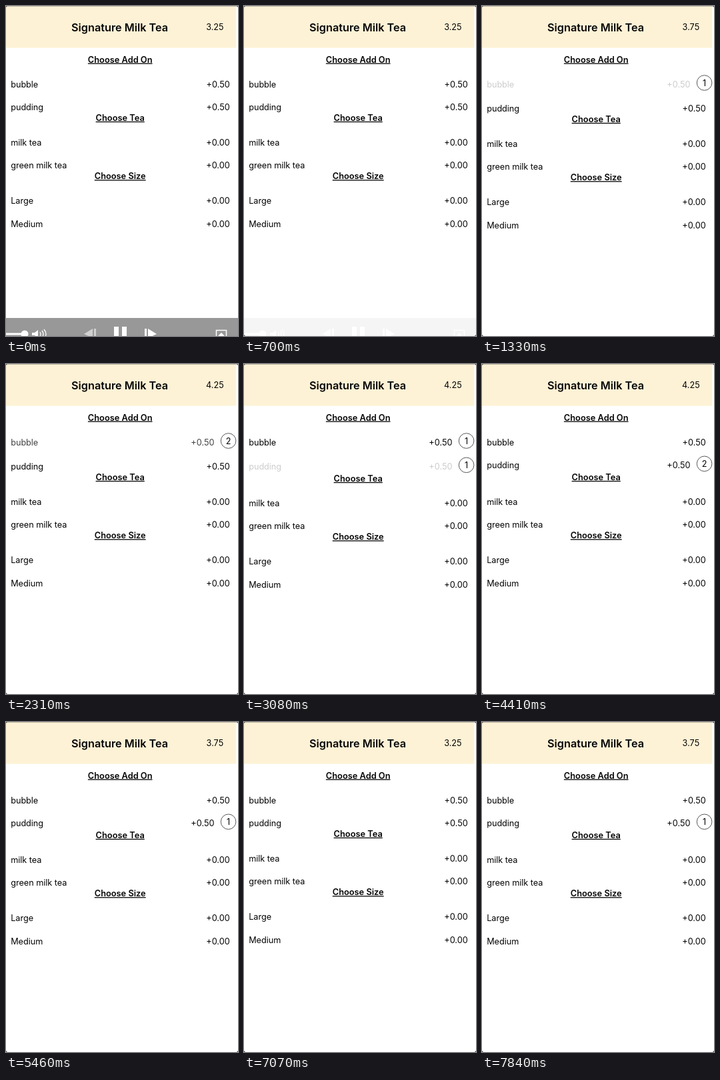
Recreate the animation shown at these times as an HTML page. Size 348 by 494 pixels, loop 8000 ms.

```html
<!DOCTYPE html>
<html lang="en">
<head>
<meta charset="utf-8">
<title>Milk tea order</title>
<style>
  html, body { margin: 0; width: 100%; height: 100%; overflow: hidden; background: #fff; }
  svg { display: block; width: 348px; height: 494px; }
  text { font: 400 12.7px Inter, Roboto, sans-serif; fill: #050505; }
  .label { letter-spacing: -0.04px; }
  .cost { font-size: 12.75px; text-anchor: end; }
  .mid { text-anchor: middle; }
  .title { font-size: 16.25px; font-weight: 600; }
  .head { font-size: 12.8px; font-weight: 600; text-decoration: underline; }
</style>
</head>
<body>
<svg id="stage" viewBox="0 0 348 494">
  <rect width="345.3" height="62.6" fill="#fef2d6"/>
  <rect width="348" height="1" fill="#000" opacity=".25"/>
  <path d="M0 0h2L0 2zM348 0h-2l2 2zM0 494h2l-2-2zM348 494h-2l2-2z" fill="#555"/>
  <text class="title mid" x="170.6" y="37.7">Signature Milk Tea</text>
  <text class="mid" id="price" x="313.4" y="36"></text>
  <g id="menu"></g>
  <g id="player" fill="#fff">
    <rect y="467" width="348" height="27" fill="#989898"/>
    <rect y="489.5" width="24" height="3"/>
    <circle cx="28" cy="491" r="5.5"/>
    <path d="M39 489h4l5-4v12l-5-4h-4z"/>
    <path d="M51 488q2 3 0 7M54 486q4 5 0 10M57 484q6 7 0 14" fill="none" stroke="#fff" stroke-width="1.3"/>
    <path id="back" d="M130 483v14l-13-6zM132 483h3v14h-3z"/>
    <path d="M162 480h7v14h-7zM174 480h7v14h-7z"/>
    <path d="M208 483h3v14h-3zM213 483v14l13-6z"/>
    <path d="M318 495.5h-2.500v-10h15v10H328" fill="none" stroke="#fff" stroke-width="1.5"/>
    <path d="M323 489l6 6h-12z"/>
  </g>
</svg>
<script>
const LOOP = 8000, FADE_IN = 150, FADE_OUT = 250, GROW = 2;
const $ = id => document.getElementById(id);

// [time, bubble count, pudding count]
const orders = [
  [0, 0, 0], [1330, 1, 0], [2160, 2, 0], [3080, 1, 1],
  [4190, 0, 2], [5230, 0, 1], [6220, 0, 0], [7560, 0, 1]
];
// [row, part, down, up]
const presses = [
  [0, 'text', 850, 1330], [0, 'text', 1690, 2160],
  [1, 'text', 2670, 3080], [1, 'text', 3920, 4190],
  [1, 'badge', 5050, 5230], [1, 'badge', 6100, 6220],
  [1, 'text', 7360, 7560]
];
const groups = [
  ['Choose Add On', ['bubble', 'pudding'], '+0.50'],
  ['Choose Tea', ['milk tea', 'green milk tea'], '+0.00'],
  ['Choose Size', ['Large', 'Medium'], '+0.00']
];

function add(parent, tag, attrs = {}, text = '') {
  const el = document.createElementNS('http://www.w3.org/2000/svg', tag);
  for (const key in attrs) el.setAttribute(key, attrs[key]);
  el.textContent = text;
  return parent.appendChild(el);
}

const toppings = [], lower = [];
groups.forEach(([head, names, cost], i) => {
  const top = i * 87.25;
  const group = add($('menu'), 'g');
  const heading = add(group, 'text', { class: 'head mid', x: 171.2, y: 84.6 + top }, head);
  lower.push(i ? group : heading);
  names.forEach((name, j) => {
    const y = 121.8 + top + j * 34.3;
    const row = add(group, 'g');
    const text = add(row, 'g');
    add(text, 'text', { class: 'label', x: 7.2, y }, name);
    const price = add(text, 'text', { class: 'cost', x: 335.8, y }, cost);
    if (i) return;
    const badge = add(row, 'g');
    add(badge, 'circle', { cx: 333.6, cy: y - 6.8, r: 11.3, fill: 'none', stroke: '#444', 'stroke-width': 0.9 });
    const digit = add(badge, 'text', { class: 'mid', x: 333.6, y: y - 2.2 });
    toppings.push({ row, text, price, badge, digit });
  });
});
lower.shift();

const clamp = x => Math.min(1, Math.max(0, x));
const ease = x => x < 0.5 ? 2 * x * x : 1 - 2 * (1 - x) ** 2;

function opacity(row, part, t) {
  const press = presses.filter(p => p[0] === row && p[1] === part && p[2] <= t).pop();
  if (!press) return 1;
  const [, , down, up] = press;
  const dim = s => 1 - 0.8 * ease(clamp((s - down) / FADE_IN));
  if (t < up) return dim(t);
  const low = dim(up);
  return low + (1 - low) * ease(clamp((t - up) / FADE_OUT));
}

const shift = (el, y) => el.setAttribute('transform', `translate(0 ${y})`);

function draw(t) {
  const counts = orders.filter(o => o[0] <= t).pop().slice(1);
  const total = 3.25 + 0.5 * (counts[0] + counts[1]);
  $('price').textContent = total.toFixed(2);

  let y = 0;
  toppings.forEach((top, i) => {
    const n = counts[i];
    shift(top.row, y);
    top.price.setAttribute('x', n ? 312.6 : 335.8);
    top.text.setAttribute('opacity', opacity(i, 'text', t));
    top.badge.setAttribute('opacity', n ? opacity(i, 'badge', t) : 0);
    top.digit.textContent = n || '';
    if (n) y += GROW;
  });
  lower.forEach(el => shift(el, y));

  $('player').setAttribute('opacity', 1 - clamp((t - 500) / 220));
  $('back').setAttribute('opacity', t < 280 ? 0.55 : 0.8);
}

const start = performance.now();
function tick() {
  draw((performance.now() - start) % LOOP);
  requestAnimationFrame(tick);
}
tick();
</script>
</body>
</html>
```
